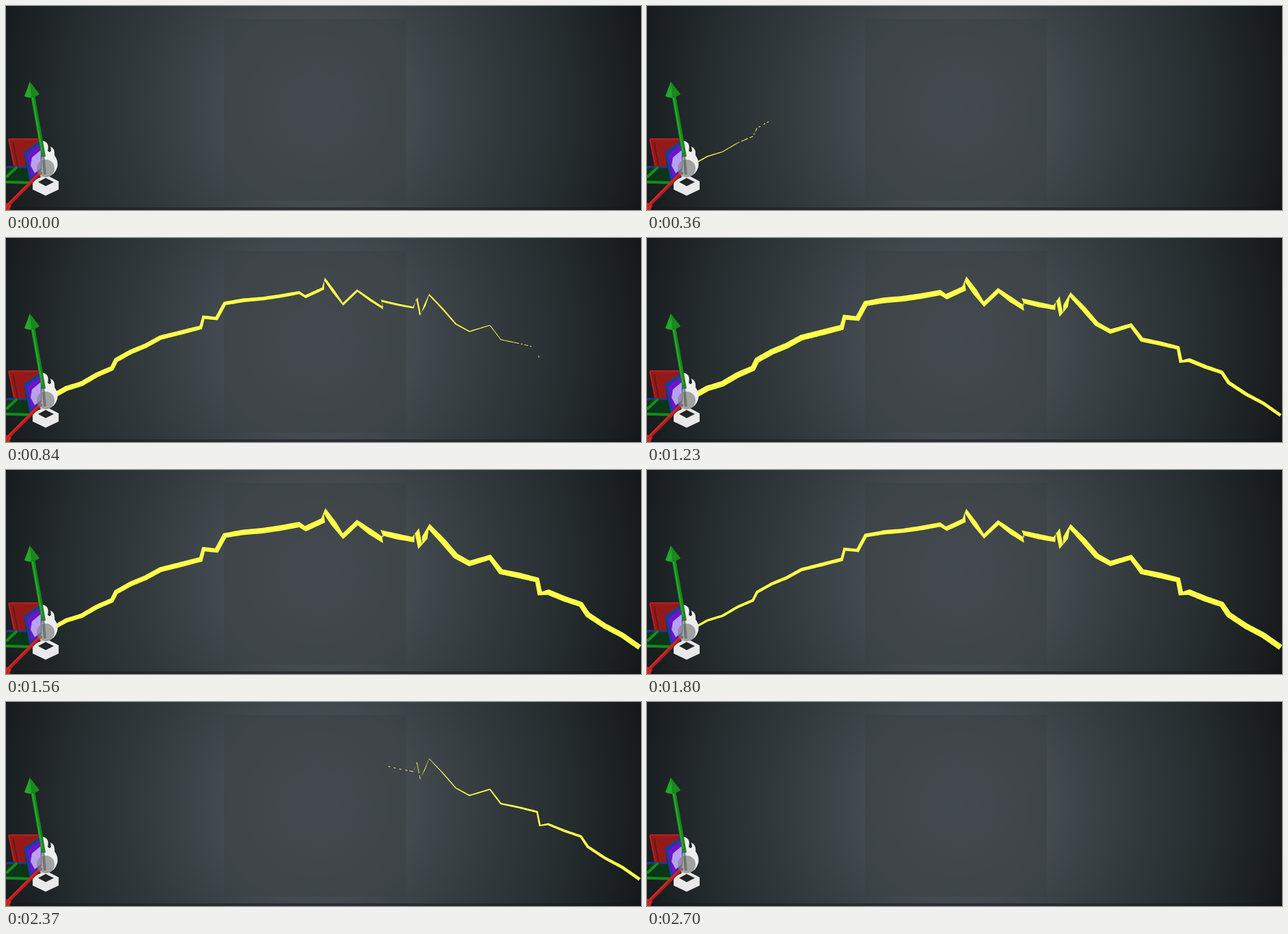
Animation of 929x299 px, one loop 3.39 s. Source, as an HTML page:

```html
<!DOCTYPE html>
<html lang="en">
<head>
<meta charset="utf-8">
<title>Ribbon trail</title>
<style>
  html, body { margin: 0; width: 100%; height: 100%; overflow: hidden; background: #15191b; }
  svg { display: block; }
</style>
</head>
<body>
<svg width="929" height="299" viewBox="0 0 929 299">
  <defs>
    <radialGradient id="sky" gradientUnits="userSpaceOnUse" cx="455" cy="150" r="490">
      <stop offset="0" stop-color="#4e555d"/>
      <stop offset=".3" stop-color="#42494f"/>
      <stop offset=".5" stop-color="#343c3f"/>
      <stop offset=".75" stop-color="#262d2f"/>
      <stop offset="1" stop-color="#15191b"/>
    </radialGradient>
  </defs>
  <rect width="929" height="299" fill="url(#sky)"/>
  <rect y="295" width="929" height="4" fill="#14181c" fill-opacity=".5"/>
  <rect x="319" y="19" width="266" height="266" fill="#3a4142" fill-opacity=".5"/>

  <path id="ribbon" fill="#ffff4a"/>

  <!-- ground and wall plates -->
  <path d="M0 236H30L35 259H0Z" fill="#0c3519"/>
  <path d="M0 236H30" stroke="#183a8c" stroke-width="3"/>
  <path d="M0 251L16 236M0 258L36 259" stroke="#178a1c" stroke-width="4"/>
  <path d="M4 194H48L50 203L27 216L29 235H12Z" fill="#941a1a"/>
  <path d="M4 195L12 234M4 195H47" stroke="#b52222" stroke-width="2"/>
  <path d="M10 200L17 234" stroke="#6d1414" stroke-width="2"/>

  <!-- flame and ring icons -->
  <path d="M50 200Q54 195 60 201Q63 206 61 212Q64 216 66 212L65 206Q72 209 71 219Q77 227 75 236Q72 247 62 250H50Z" fill="#eee"/>
  <path d="M58 247L77 257V269L58 278L39 269V257ZM47 258L58 264L70 258L58 252Z" fill="#e9e9e9" fill-rule="evenodd"/>

  <path d="M26 214L52 196V240L35 259Z" fill="#193d99"/>
  <path d="M31 217L51 202V238L37 252Z" fill="#6c14c8"/>
  <path d="M38 222L51 211V238L42 245L36 234Z" fill="#b7a0f0"/>

  <!-- axes -->
  <path d="M39 130L55 221" stroke="#17851a" stroke-width="6"/>
  <path d="M38 130L53 215" stroke="#25ad28" stroke-width="2"/>
  <path d="M35 111L49 129Q39 138 27 132Z" fill="#1a881d"/>
  <path d="M35 111L37 134Q31 135 27 132Z" fill="#25a629"/>
  <path d="M52 243L2 293" stroke="#b81f1c" stroke-width="5"/>
  <path d="M51 242L2 291" stroke="#d52d28" stroke-width="1.5"/>
  <path d="M0 288L8 292L5 299H0Z" fill="#c92520"/>
  <circle cx="58" cy="238" r="13" fill="#858585" fill-opacity=".72"/>
  <path d="M54 217L57 247" stroke="#5b655b" stroke-width="4" stroke-opacity=".7"/>
</svg>
<script>
const LOOP = 3390, START = 270, LIFE = 1715, SPEED = 1.25;
const ORIGIN = 75, MAX_WIDTH = 8.4, STEP = 3, SPAN = 32, WOBBLE = 2;
const ribbon = document.getElementById("ribbon");

// Only the sharp kinks; the stretches between them are roughened below.
const kinks = `66,233 155,191 161,179 226,146 285,131 289,116 308,118 320,96 429,80 438,86
  464,74 466,60 493,97 514,77 552,103 549,92 596,102 601,88 606,113 619,83 658,126 678,137
  708,128 724,149 777,161 781,181 793,179 841,197 851,212 927,260`
  .split(/\s+/).map(pair => pair.split(",").map(Number));

let seed = 7;
const random = () => (seed = seed * 16807 % 2147483647) / 2147483647;
const mix = (a, b, k) => a.map((v, i) => v + (b[i] - v) * k);
const distance = (a, b) => Math.hypot(b[0] - a[0], b[1] - a[1]);

// Cuts a line into equal parts no longer than the given size.
function divide(line, size, visit) {
  for (let i = 0; i < line.length - 1; i++) {
    const count = Math.ceil(distance(line[i], line[i + 1]) / size);
    for (let j = 0; j < count; j++) visit(i, j / count);
  }
  visit(line.length - 2, 1);
}

const points = [];
divide(kinks, SPAN, (i, k) => {
  const [x, y] = mix(kinks[i], kinks[i + 1], k);
  points.push([x, y + (k % 1 ? (random() * 2 - 1) * WOBBLE : 0)]);
});

// Normals follow the neighbours, so the ribbon pinches at sharp bends.
const normals = points.map((p, i) => {
  const a = points[Math.max(i - 1, 0)], b = points[Math.min(i + 1, points.length - 1)];
  const length = distance(a, b);
  return [(a[1] - b[1]) / length, (b[0] - a[0]) / length];
});

const samples = [];
divide(points, STEP, (i, k) => samples.push({
  at: mix(points[i], points[i + 1], k),
  normal: mix(normals[i], normals[i + 1], k)
}));

function widthAt(x, time) {
  const age = (time - START - (x - ORIGIN) / SPEED) / LIFE;
  return Math.max(0, MAX_WIDTH * 4 * age * (1 - age));
}

const edge = ({ at, normal }, offset) =>
  at.map((v, i) => (v + normal[i] * offset).toFixed(2)).join(" ");

function draw(now) {
  const time = now % LOOP;
  let path = "";
  for (let i = 0; i < samples.length - 1; i++) {
    const a = samples[i], b = samples[i + 1];
    const wa = widthAt(a.at[0], time), wb = widthAt(b.at[0], time);
    // Parts thinner than a pixel break up into dashes.
    if (Math.min(wa, wb) <= (i * 0.37) % 1 * 0.8) continue;
    const ra = Math.max(wa, 1) / 2, rb = Math.max(wb, 1) / 2;
    path += `M${edge(a, ra)}L${edge(b, rb)}L${edge(b, -rb)}L${edge(a, -ra)}Z`;
  }
  ribbon.setAttribute("d", path);
  requestAnimationFrame(draw);
}
requestAnimationFrame(draw);
</script>
</body>
</html>
```
